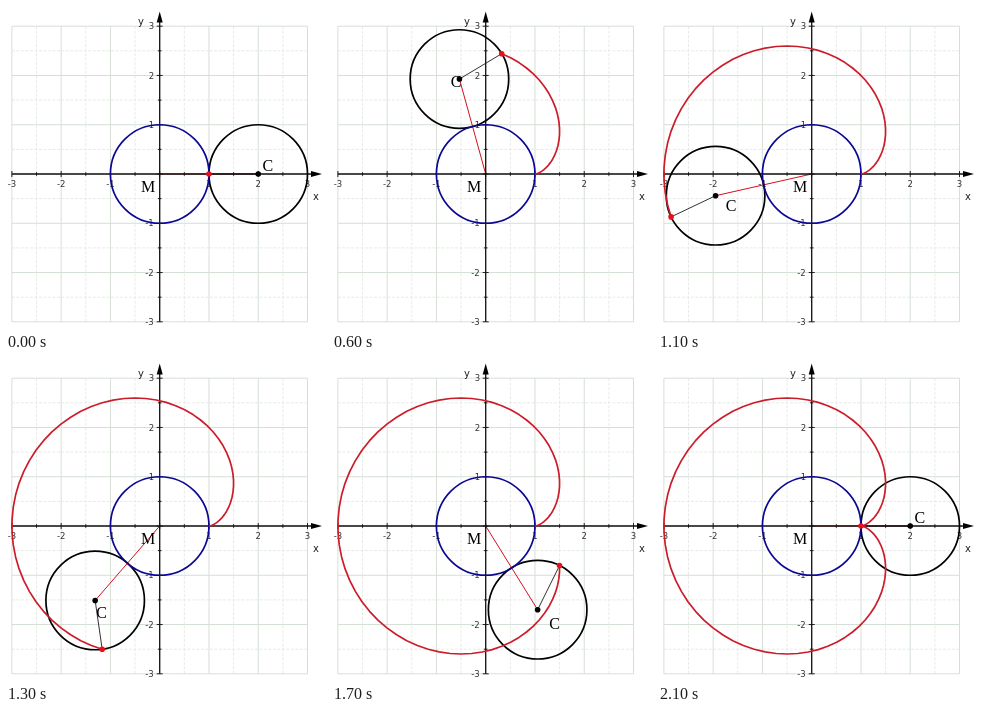
Animation of 320x324 px, one loop 5300 ms. Source, as an HTML page:

```html
<!DOCTYPE html>
<html lang="en">
<head>
<meta charset="utf-8">
<title>Cardioid as a rolling circle</title>
<style>
  html, body { margin: 0; width: 100%; height: 100%; overflow: hidden; background: #fff; }
  svg { display: block; width: 100%; height: 100%; }
  path, circle, line { fill: none; }
  .major { stroke: #d6dfd6; stroke-width: 1; }
  .minor { stroke: #e6ebe6; stroke-width: 1; stroke-dasharray: 3 1.5; }
  .axis { stroke: #111; stroke-width: 1.3; }
  .tick { stroke: #222; stroke-width: 1; }
  .arrow { fill: #000; }
  .ring { stroke-width: 1.7; }
  .num { font: 8.5px "DejaVu Sans", sans-serif; fill: #333; text-anchor: middle; }
  .name { font: 10px "DejaVu Sans", sans-serif; fill: #222; text-anchor: middle; }
  .point { font: 16px "Liberation Serif", serif; fill: #000; text-anchor: middle; }
</style>
</head>
<body>
<svg viewBox="0 0 320 324">
  <g id="grid"></g>
  <line id="arm" stroke="#d8101c" stroke-width="1"/>
  <line id="spoke" stroke="#333" stroke-width="1"/>
  <g id="axes"></g>
  <circle id="roller" class="ring" stroke="#000"/>
  <circle id="base" class="ring" stroke="#0c0894"/>
  <path id="trace" stroke="#cc1c2a" stroke-width="1.7" stroke-linejoin="round"/>
  <circle id="center" r="2.8" style="fill:#000"/>
  <circle id="pen" r="2.8" style="fill:#e8101a"/>
  <text class="point" x="142" y="185.5">M</text>
  <text class="point" id="label">C</text>
</svg>
<script>
const OX = 153.7, OY = 168, UNIT = 49.27;
const STEP_MS = 100, LAST_STEP = 21, LOOP_MS = 5300;
const SAMPLES = 99, SAMPLES_PER_STEP = 4.9;

const $ = id => document.getElementById(id);
const px = x => OX + UNIT * x;
const py = y => OY - UNIT * y;

function set(el, attrs) {
  for (const key in attrs) el.setAttribute(key, attrs[key]);
  return el;
}

function add(parent, tag, attrs, text = '') {
  const el = document.createElementNS('http://www.w3.org/2000/svg', tag);
  el.textContent = text;
  return parent.appendChild(set(el, attrs));
}

function segment(parent, cls, x1, y1, x2, y2) {
  add(parent, 'line', { class: cls, x1, y1, x2, y2 });
}

function drawGrid() {
  const grid = $('grid'), axes = $('axes');
  for (const cls of ['minor', 'major']) {
    for (let v = cls === 'minor' ? -2.5 : -3; v <= 3; v++) {
      segment(grid, cls, px(v), py(3), px(v), py(-3));
      segment(grid, cls, px(-3), py(v), px(3), py(v));
    }
  }
  for (let v = -3; v <= 3; v += 0.5) {
    const half = v % 1 ? 1.8 : 3;
    segment(axes, 'tick', px(v), OY - half, px(v), OY + half);
    segment(axes, 'tick', OX - half, py(v), OX + half, py(v));
    if (v && v % 1 === 0) {
      const shift = v < 0 ? -2 : 0;
      add(axes, 'text', { class: 'num', x: px(v), y: 181 }, v);
      add(axes, 'text', { class: 'num', x: 145.5 + shift, y: py(v) + 3.2 }, v);
    }
  }
  segment(axes, 'axis', px(-3), OY, 308, OY);
  segment(axes, 'axis', OX, py(-3), OX, 14);
  add(axes, 'path', { class: 'arrow', d: `M316 ${OY}l-11 -3v6z` });
  add(axes, 'path', { class: 'arrow', d: `M${OX} 5.5l-3 11h6z` });
  add(axes, 'text', { class: 'name', x: 310, y: 194 }, 'x');
  add(axes, 'text', { class: 'name', x: 135, y: 19 }, 'y');
}

const angleAt = i => 2 * Math.PI * i / SAMPLES;
const centerAt = a => [px(2 * Math.cos(a)), py(2 * Math.sin(a))];
const penAt = a => [
  px(2 * Math.cos(a) - Math.cos(2 * a)),
  py(2 * Math.sin(a) - Math.sin(2 * a))
];

// Label offset from the rolling centre: [sample, dx, dy]
const offsets = [
  [0, 9.5, -3.5], [19, -10, -2], [39, 3.5, 17.5], [53, 15.5, 15.5],
  [73, -2.5, 19.5], [83, 17, 19.5], [99, 9.5, -3.5]
];

function labelOffset(i) {
  const n = Math.max(1, offsets.findIndex(o => o[0] >= i));
  const [i0, x0, y0] = offsets[n - 1], [i1, x1, y1] = offsets[n];
  const f = (i - i0) / (i1 - i0);
  return [x0 + f * (x1 - x0), y0 + f * (y1 - y0)];
}

function render(time) {
  const step = Math.min(LAST_STEP, Math.floor(time % LOOP_MS / STEP_MS));
  const sample = Math.min(SAMPLES, Math.floor(SAMPLES_PER_STEP * step + 1e-6));
  const [cx, cy] = centerAt(angleAt(sample));
  const [x, y] = penAt(angleAt(sample));
  const [dx, dy] = labelOffset(sample);
  const curve = Array.from({ length: sample + 1 }, (_, i) =>
    penAt(angleAt(i)).map(v => v.toFixed(2)).join(' '));

  set($('roller'), { cx, cy });
  set($('center'), { cx, cy });
  set($('pen'), { cx: x, cy: y });
  set($('arm'), { x1: OX, y1: OY, x2: cx, y2: cy });
  set($('spoke'), { x1: cx, y1: cy, x2: x, y2: y });
  set($('label'), { x: cx + dx, y: cy + dy });
  set($('trace'), { d: 'M' + curve.join('L') });
}

function tick(now) {
  render(now);
  requestAnimationFrame(tick);
}

drawGrid();
set($('base'), { cx: OX, cy: OY, r: UNIT });
set($('roller'), { r: UNIT });
render(0);
requestAnimationFrame(tick);
</script>
</body>
</html>
```
